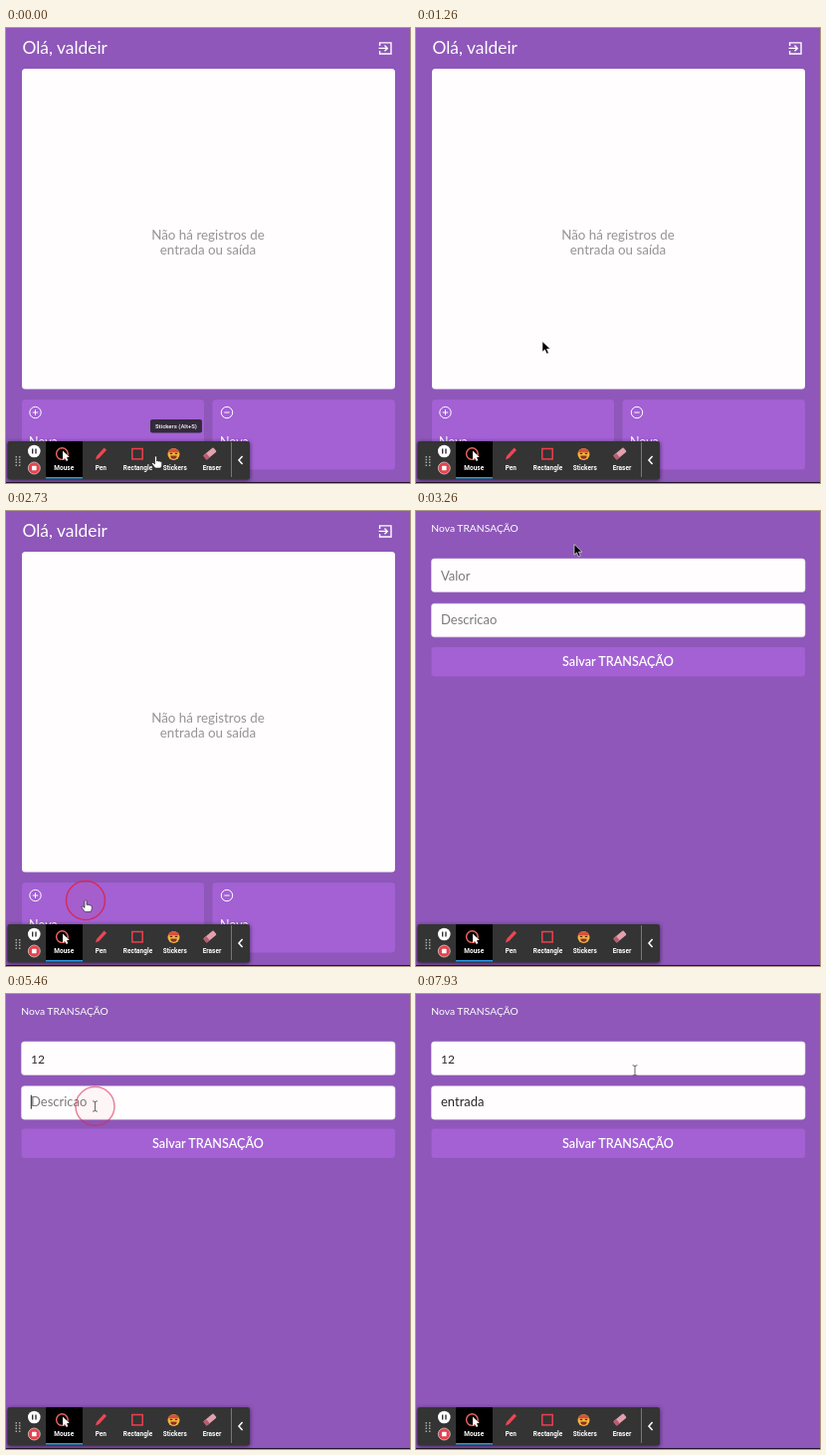
These frames come from a looping animation (406x458 px, 8 s). An HTML page:

```html
<!DOCTYPE html>
<html lang="pt-BR">
<head>
<meta charset="utf-8">
<style>
html, body { margin: 0; width: 100%; height: 100%; overflow: hidden; background: #8e57b9; }
svg { display: block; width: 100%; height: 100%; font-family: Lato, "Open Sans", sans-serif; }
.line { fill: none; stroke: #fff; }
.bar text { font: 700 6.5px Roboto, sans-serif; fill: #fff; text-anchor: middle; }
.mid { text-anchor: middle; }
.card { fill: #a361d4; }
.field { fill: #fffdfe; stroke: #e6dae9; stroke-width: .6; }
.ph { fill: #7b7b7b; }
.val { fill: #282828; }
</style>
</head>
<body>
<svg viewBox="0 0 406 458">
  <rect width="406" height="458" fill="#8e57b9"/>

  <g id="home">
    <text x="16.5" y="26" font-size="17.4" fill="#fff">Olá, valdeir</text>
    <path class="line" stroke-width="1.4" d="M375.6 18V14.9H387V26H375.6V22.9M374.6 20.4H383M380.5 17.6L383.3 20.4L380.5 23.2"/>
    <rect x="16" y="41" width="375" height="322.5" rx="3.5" fill="#fffdfe"/>
    <g class="mid" font-size="13.4" fill="#949494">
      <text x="203" y="213.3">Não há registros de</text>
      <text x="203" y="227.8">entrada ou saída</text>
    </g>
    <rect class="card" x="16" y="374" width="183" height="70.5" rx="3.5"/>
    <rect class="card" x="207.5" y="374" width="183.5" height="70.5" rx="3.5"/>
    <g class="line">
      <circle cx="29.5" cy="387" r="5.7"/>
      <circle cx="222" cy="387" r="5.7"/>
      <path d="M26.8 387h5.4M29.5 384.3v5.4M219.3 387h5.4"/>
    </g>
    <g font-size="12.5" fill="#fff">
      <text x="23" y="421">Nova</text>
      <text x="215" y="421">Nova</text>
    </g>
  </g>

  <g id="form">
    <text x="15.3" y="21" font-size="10.3" fill="#fff">Nova TRANSAÇÃO</text>
    <g id="amount">
      <rect class="field" x="15.5" y="48" width="375.5" height="33.5" rx="3"/>
      <text x="25" y="69.7"></text>
      <path class="caret" stroke="#222" d="M0 58v14"/>
      <g id="spinner">
        <rect x="372" y="58.5" width="9.5" height="13.5" fill="#ededed"/>
        <path d="M374.4 63.5l2.3-2.7 2.3 2.7zM374.4 67l2.3 2.7 2.3-2.7z" fill="#484848"/>
      </g>
    </g>
    <g id="note">
      <rect class="field" x="15.5" y="93" width="375.5" height="33.5" rx="3"/>
      <text x="25" y="113.8" font-size="13.1"></text>
      <path class="caret" stroke="#222" d="M0 102v14"/>
    </g>
    <g id="save">
      <rect class="card" x="15.5" y="137" width="375.5" height="29.5" rx="3"/>
      <text class="mid" x="203" y="156.3" font-size="12.6" font-weight="600" fill="#fff">Salvar TRANSAÇÃO</text>
    </g>
  </g>

  <rect y="457" width="406" height="1" fill="#21152a"/>

  <g class="bar">
    <rect x="1.5" y="416" width="243.5" height="38.5" rx="2" fill="#343434" style="filter:drop-shadow(0 1px 2px #0009)"/>
    <rect x="40" y="416" width="37" height="37" fill="#000"/>
    <rect x="40" y="452" width="37" height="1.5" fill="#2499e8"/>
    <path d="M10.3 431v10M13.7 431v10" stroke="#aaa" stroke-width="1.5" stroke-dasharray="1.5 1.3"/>
    <circle cx="28.3" cy="426" r="6.3" fill="#fff"/>
    <path d="M26.7 423.4v5.2M30 423.4v5.2" stroke="#333" stroke-width="1.4"/>
    <circle cx="28.3" cy="443" r="6" fill="#e5424d" stroke="#ddd" stroke-width=".7"/>
    <rect x="26" y="440.7" width="4.6" height="4.6" rx=".6" fill="#fff"/>
    <circle cx="56.4" cy="428.6" r="5.8" fill="none" stroke="#ee675f" stroke-width="1.4"/>
    <path d="M57 425.5v9.2l2.1-2 1.6 3.2 1.7-.8-1.6-3.1h3z" fill="#fff"/>
    <path d="M90 434.5l1-3.6 7.6-8.4 2.5 2.2-7.6 8.4z" fill="#ec4654"/>
    <rect x="126.8" y="423.5" width="10.4" height="10.4" fill="none" stroke="#ee3f4d" stroke-width="1.5"/>
    <circle cx="168.5" cy="429" r="6" fill="#f4b63d"/>
    <path d="M162.8 427.3a6 6 0 0 1 11.4 0z" fill="#d94f3d"/>
    <path d="M164.8 428.4h2.4M169.8 428.4h2.4" stroke="#4d2b18" stroke-width="1.2"/>
    <path d="M165.3 430.6h6.4a3.2 3.2 0 0 1-6.4 0z" fill="#8b302b"/>
    <g transform="rotate(-40 205 428.5)">
      <rect x="198.5" y="425.6" width="13" height="5.6" rx="1" fill="#e2a0ad"/>
      <rect x="198.5" y="425.6" width="4" height="5.6" rx="1" fill="#b95c70"/>
    </g>
    <text x="58.3" y="445">Mouse</text>
    <text x="95.3" y="445">Pen</text>
    <text x="132.5" y="445">Rectangle</text>
    <text x="169.8" y="445">Stickers</text>
    <text x="207" y="445">Eraser</text>
    <path d="M226.5 417v35" stroke="#777"/>
    <path class="line" stroke-width="1.5" d="M237.6 431l-3.6 4 3.6 4"/>
    <g id="tip">
      <rect x="145" y="394" width="52" height="13.5" rx="2" fill="#332a3a"/>
      <text x="171" y="402.8" style="font-size:6px;font-weight:500">Stickers (Alt+S)</text>
    </g>
  </g>

  <circle id="ring" r="19.5" fill="#e0305010" stroke="#d8284f" stroke-width="1.5"/>
  <g id="cursor">
    <path id="arrow" d="M0 0v10.6l2.5-2.3 1.9 4.2 1.9-.8-1.8-4.1h3.4z" fill="#000" stroke="#fff" stroke-width=".6"/>
    <path id="hand" d="M-1 .8Q0-.6 1 .8V5l1-.5 1 .7 1-.3 .9.8 .9-.1.4.9v3L5 12H-.6L-4 7.5q.2-1.6 1.6-.8L-1 8z" fill="#fff" stroke="#111" stroke-width=".6"/>
    <path id="beam" d="M-2.4-5.2Q0-5.2 0-4Q0-5.2 2.4-5.2M0-4.5v9M-2.4 5.2Q0 5.2 0 4Q0 5.2 2.4 5.2" fill="none" stroke="#555" stroke-width=".9"/>
  </g>
</svg>
<script>
const LOOP = 8000, FORM_AT = 2900;
const $ = id => document.getElementById(id);
const show = (el, on) => { el.style.display = on ? '' : 'none'; };
const shift = (id, y) => $(id).setAttribute('transform', `translate(0 ${y})`);

// Pointer stops: time, x, y
const path = [
  [60, 150.5, 431], [800, 127, 315.5], [1260, 127, 315.5], [2060, 98, 366],
  [2460, 80, 391.5], [2900, 80, 391.5], [3260, 159, 33.5], [3530, 164, 50],
  [3900, 152, 65], [5320, 152, 65], [5410, 89.5, 113], [7590, 89.5, 113], [7930, 220, 77]
];
// Clicks: time, x, y, fade length, strength
const clicks = [[2725, 80, 392, 300, .9], [3700, 152, 65, 230, .65], [5395, 89.5, 113, 270, .75]];
const amountKeys = [4800, 5000];
const noteKeys = [6130, 6400, 6660, 6800, 6930, 7130, 7260];
const blinkStarts = [3830, ...amountKeys, 5430, 5640, ...noteKeys];

function pointer(t) {
  const i = path.findIndex(p => p[0] > t);
  if (i === 0) return path[0].slice(1);
  if (i < 0) return path.at(-1).slice(1);
  const [t0, x0, y0] = path[i - 1], [t1, x1, y1] = path[i];
  const u = (t - t0) / (t1 - t0), e = u * u * (3 - 2 * u);
  return [x0 + (x1 - x0) * e, y0 + (y1 - y0) * e];
}

function fillField(id, hint, word, keys, size, t, focused) {
  const typed = word.slice(0, keys.filter(k => k <= t).length);
  const text = $(id).querySelector('text'), caret = $(id).querySelector('.caret');
  text.textContent = typed || hint;
  text.setAttribute('class', typed ? 'val' : 'ph');
  text.setAttribute('font-size', typed ? size : 13);
  const start = blinkStarts.filter(k => k <= t).at(-1);
  show(caret, focused && (t - start) % 1000 < 500);
  const x = 25.3 + (typed ? text.getComputedTextLength() : 0);
  caret.setAttribute('transform', `translate(${x} 0)`);
}

function draw(t) {
  const form = t >= FORM_AT, hover = t >= 3800 && t < 4800;
  show($('home'), !form);
  show($('form'), form);
  show($('tip'), t < 200);
  if (form) {
    show($('spinner'), hover);
    shift('amount', hover ? -1 : 0);
    shift('note', t < 3800 ? .3 : hover ? -1 : -.3);
    shift('save', t < 3800 ? 0 : -1.5);
    fillField('amount', 'Valor', '12', amountKeys, 12, t, t >= 3830 && t < 5430);
    fillField('note', 'Descricao', 'entrada', noteKeys, 13, t, t >= 5430);
  }

  const [x, y] = pointer(t);
  const beam = form && (y > 48 && y < 82 || y > 93 && y < 127);
  const hand = !form && y > 374;
  show($('beam'), beam);
  show($('hand'), hand);
  show($('arrow'), !beam && !hand);
  $('cursor').setAttribute('transform', `translate(${x} ${y})`);

  const hit = clicks.find(c => t >= c[0] && t < c[0] + c[3]);
  show($('ring'), hit);
  if (hit) {
    const [start, cx, cy, life, strength] = hit;
    $('ring').setAttribute('transform', `translate(${cx} ${cy})`);
    $('ring').setAttribute('opacity', strength * (1 - (t - start) / life));
  }
}

function tick() {
  draw(performance.now() % LOOP);
  requestAnimationFrame(tick);
}
tick();
</script>
</body>
</html>
```
